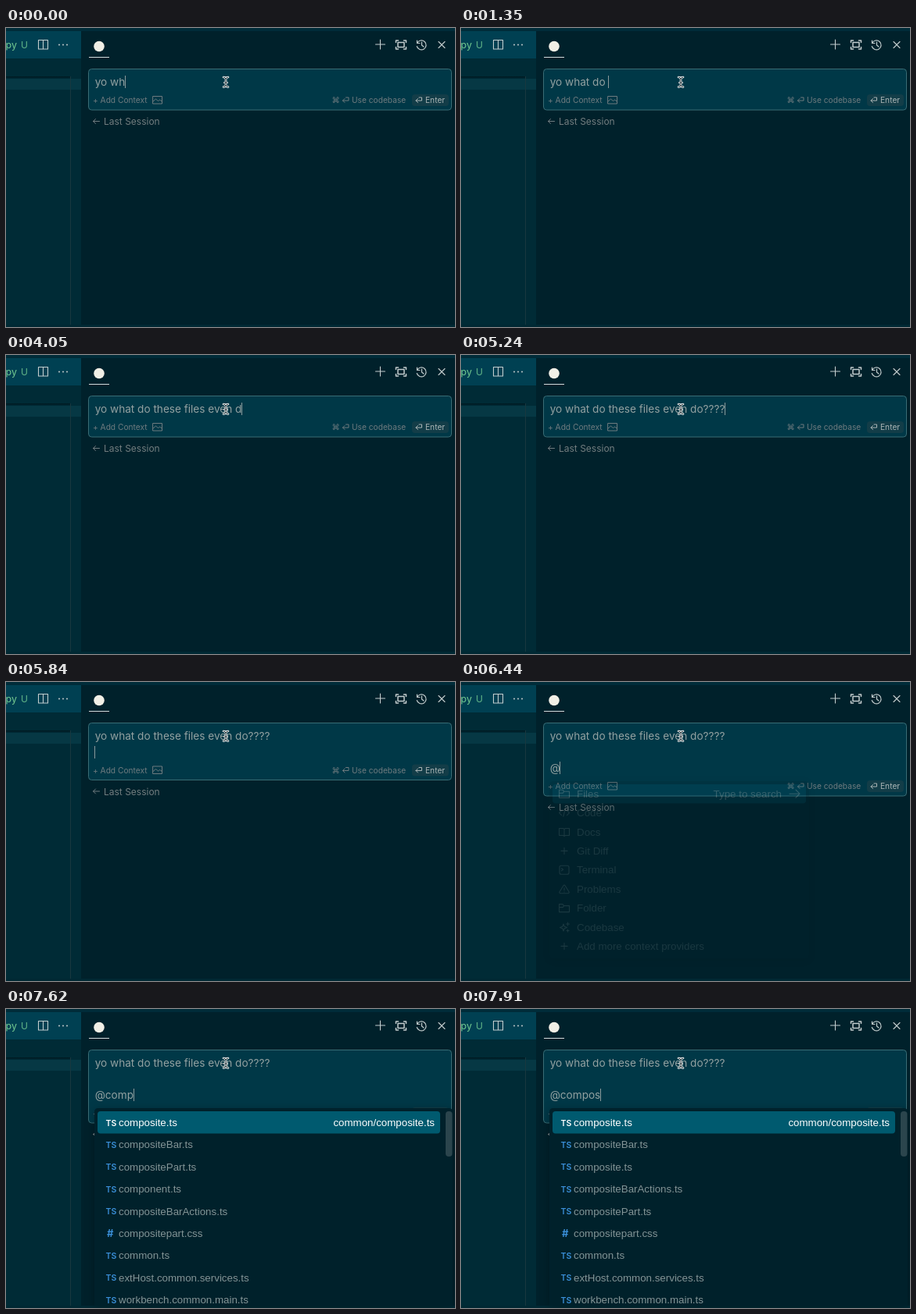
An HTML page that plays this animation: 574 px wide and 383 px high, repeating every 8 s.

```html
<!DOCTYPE html>
<html lang="en">
<head>
<meta charset="utf-8">
<title>Chat context menu</title>
<style>
  html, body { margin: 0; width: 100%; height: 100%; overflow: hidden; background: #00212b; }
  svg { display: block; }
  text { font-family: Inter, "Open Sans", sans-serif; white-space: pre; }
  .line { fill: none; stroke-linecap: round; stroke-linejoin: round; }
  .tool { stroke: #c3cccd; stroke-width: 1.1; }
  .prompt { font-size: 13.6px; fill: #93a1a1; }
  .small { font-size: 10.2px; fill: #6f7b7f; }
  .dim { stroke: #6f7b7f; }
  .last { font-size: 12px; fill: #727d7f; }
  #menu text { font: 13.333px "Liberation Sans", Arial, sans-serif; fill: #839496; }
  #menu .line { stroke: #839496; stroke-width: 1.1; }
  #menu .on text { fill: #fff; }
  #menu .on .line { stroke: #fff; }
  #menu .kind { font: 600 10.5px Inter, sans-serif; fill: #3a8fd8; }
  #menu .hash { font: 700 13px Inter, sans-serif; fill: #3a8fd8; }
  .panel { fill: #00212b; filter: drop-shadow(0 2px 6px #0004); }
</style>
</head>
<body>
<svg width="574" height="383" viewBox="0 0 574 383">
  <defs>
    <linearGradient id="fade" x2="0" y2="1">
      <stop stop-color="#001820"/><stop offset="1" stop-color="#001820" stop-opacity="0"/>
    </linearGradient>
    <path id="beam" d="M278 63q2.700 0 3 2.300q.300-2.300 3-2.300M278 75.500q2.700 0 3-2.300q.300 2.300 3 2.300M281 65.300v7.900M279.500 70h3"/>
    <path id="return" d="M4.500 0h3.500v4h-7.500M3 1.500L.500 4 3 6.500"/>
  </defs>
  <rect width="574" height="383" fill="#00212b"/>
  <rect width="96" height="383" fill="#002b36"/>
  <rect y="4" width="96" height="35" fill="#004052"/>
  <rect y="62" width="82" height="3" fill="url(#fade)"/>
  <rect y="65" width="96" height="14" fill="#063844"/>
  <path d="M82.500 62V380" stroke="#18383f"/>
  <rect width="574" height="4" fill="#002c39"/>
  <rect y="380" width="574" height="3" fill="#002833"/>

  <g fill="#73c991">
    <text x="14" y="26" font-size="12.500" text-anchor="end">py</text>
    <text x="19" y="26" font-size="12" opacity=".85">U</text>
  </g>
  <g class="line tool">
    <path d="M41.500 15.500h12v11.500h-12zM47.500 15.500v11.500"/>
    <path d="M472.500 21h12M478.500 15v12"/>
    <path d="M498.500 18.500V16h3M508.500 16h3v2.500M511.500 24.500V27h-3M501.500 27h-3v-2.500M501 18.500h8v6h-8z" stroke-width="1.500"/>
    <path d="M525.500 16v3.500h3.500M525.700 19.200A6 6 0 1 1 525.300 23.500M531.500 18v4l2.500 2" stroke-width="1.200"/>
    <path d="M553 17.500l8 8M561 17.500l-8 8"/>
  </g>
  <g fill="#c3cccd">
    <circle cx="68" cy="21.500" r="1"/><circle cx="73" cy="21.500" r="1"/><circle cx="78" cy="21.500" r="1"/>
  </g>
  <circle cx="119" cy="23.500" r="6.800" fill="#f1efe6"/>
  <path d="M106 37.500h26" stroke="#d5dadb"/>

  <rect id="box" x="105.500" y="52.500" width="464" rx="4" fill="#003847" stroke="#3a6c74"/>
  <text class="prompt" x="113.700" y="74"></text>
  <text class="prompt" x="113.700" y="94.500"></text>
  <text class="prompt" x="113.700" y="115"></text>
  <rect id="caret" width="1" height="16" fill="#8b9a9b"/>

  <g id="foot">
    <text class="small" x="111" y="96">+ Add Context</text>
    <path class="line dim" d="M188 87.500h11.500v9.500h-11.500zM188 94l3.500-3 3 2.500 2-1.500 3 2"/>
    <text class="small" x="416.500" y="96" style="font-family:'DejaVu Sans',sans-serif">⌘</text>
    <use href="#return" class="line dim" x="430" y="89"/>
    <text class="small" x="442" y="96">Use codebase</text>
    <rect x="519" y="85" width="47" height="15" rx="4" fill="#133d48"/>
    <use href="#return" class="line" stroke="#a9b4b5" x="523.500" y="89"/>
    <text class="small" x="536" y="96" style="fill:#a9b4b5">Enter</text>
    <path class="line dim" d="M119.500 119.500h-8M114.500 116.500l-3 3 3 3"/>
    <text class="last" x="125" y="124">Last Session</text>
  </g>

  <g id="menu"></g>

  <g class="line">
    <use href="#beam" stroke="#fff" stroke-width="2.600"/>
    <use href="#beam" stroke="#0a1c22" stroke-width=".900"/>
  </g>
</svg>
<script>
const LOOP = 8000;

// [time, typed characters]
const keys = [
  [0, 'yo wh'], [150, 'at'], [750, ' '], [1050, 'do'],
  ...[...' these '].map((c, i) => [1350 + i * 150, c]),
  [2550, 'fi'], [2700, 'l'], [2850, 'es'], [3150, ' '],
  [3450, 'e'], [3600, 'v'], [3750, 'en'], [4050, ' d'], [4350, 'o'],
  [4650, '?'], [4790, '?'], [5090, '?'], [5240, '?'],
  [5840, '\n'], [6140, '\n'], [6440, '@'],
  [7030, 'c'], [7180, 'o'], [7330, 'm'], [7620, 'p'], [7770, 'o'], [7910, 's']
];

const folder = 'M.5 12V2h4.500l1.500 2h7v8zM.5 6h5l1-2';
const plus = 'M7 3v8M3 7h8';
const sparkle = 'M6 3l1.200 3.300L10.500 7.500 7.200 8.700 6 12 4.800 8.700 1.500 7.500 4.800 6.300zM11.500 1v4M9.500 3h4M11.500 10v3M10 11.500h3';
const code = 'M3.500 4L.5 7l3 3M10.500 4l3 3-3 3M8.200 2.500l-2.400 9';
const providers = [
  ['Files', folder], ['Code', code],
  ['Docs', 'M.5 2.500h5L7 3.500l1.500-1h5v9h-5L7 12.500l-1.500-1h-5zM7 3.500v9'],
  ['Git Diff', plus],
  ['Terminal', 'M3 1.500h8q2 0 2 2v7q0 2-2 2H3q-2 0-2-2v-7q0-2 2-2zM3.500 5l2 1.500-2 1.500'],
  ['Problems', 'M6 2.500q1-1.500 2 0l5 8q.7 1.800-1 2H2q-1.700-.2-1-2zM7 5.500v3M7 10.500v.2'],
  ['Folder', folder], ['Codebase', sparkle], ['Add more context providers', plus]
];
const matches = [providers[1], providers[7]];

const common = ['common.ts', 'composite.ts', 'command.ts', 'comments.ts', 'compositeBar.ts',
  'compare.ts', 'commands.ts', 'extHost.common.services.ts', 'workbench.common.main.ts'];
const composites = ['composite.ts', 'compositeBar.ts', 'composite.ts', 'compositeBarActions.ts',
  'compositePart.ts', 'compositepart.css', 'common.ts', 'extHost.common.services.ts',
  'workbench.common.main.ts'];
const components = ['composite.ts', 'compositeBar.ts', 'compositePart.ts', 'component.ts',
  'compositeBarActions.ts', 'compositepart.css', ...composites.slice(6)];

const $ = id => document.getElementById(id);
const lines = document.querySelectorAll('.prompt');
const pen = document.createElement('canvas').getContext('2d');
pen.font = '13.6px Inter, "Open Sans", sans-serif';

const highlight = (right, h) =>
  `<rect x="117" y="131" width="${right - 117}" height="${h}" rx="4" fill="#005a6f"/>`;

function providerMenu(items, right) {
  const pitch = 24.4;
  const rows = items.map(([name, icon], i) => {
    const y = 143.2 + i * pitch;
    const hint = i ? '' :
      `<text x="${right - 31}" y="${y + 4.5}" text-anchor="end">Type to search</text>` +
      `<path class="line" d="M${right - 21} ${y}h13m-5 -5l5 5l-5 5"/>`;
    return `<g class="${i ? '' : 'on'}"><path class="line" transform="translate(125 ${y - 7})" d="${icon}"/>` +
      `<text x="148" y="${y + 4.5}">${name}</text>${hint}</g>`;
  });
  return `<rect class="panel" x="113" y="127" width="${right - 109}" height="${items.length * pitch + 8}" rx="5"/>` +
    highlight(right, 24.4) + rows.join('');
}

function fileMenu(files) {
  const rows = files.map((name, i) => {
    const y = 150 + i * 28.4;
    const css = name.endsWith('css');
    const path = i ? '' : `<text x="548" y="${y}" text-anchor="end">common/${name}</text>`;
    return `<g class="${i ? '' : 'on'}"><text class="${css ? 'hash' : 'kind'}" x="${css ? 129 : 127.5}" y="${y - .5}">${css ? '#' : 'TS'}</text>` +
      `<text x="144" y="${y}">${name}</text>${path}</g>`;
  });
  return '<path class="panel" d="M113 380V132q0-5 5-5h448q5 0 5 5v248z"/>' + highlight(555, 28.4) + rows.join('') +
    '<rect x="562" y="131" width="8.500" height="58" rx="4" fill="#2b454d"/>';
}

function menuFor(query) {
  if (!query) return '';
  if (query === '@') return providerMenu(providers, 441);
  if (query.length < 4) return providerMenu(matches, 407);
  if (query === '@com') return fileMenu(common);
  return fileMenu(query === '@comp' ? components : composites);
}

let shown;
function draw(t) {
  const text = keys.filter(k => k[0] <= t).map(k => k[1]).join('');
  $('caret').style.opacity = t >= 600 && t < 750 ? 0 : 1;
  $('menu').style.opacity = t < 6590 ? .2 : t < 6730 ? .85 : 1;
  if (text === shown) return;
  shown = text;

  const rows = text.split('\n');
  const last = rows.length - 1;
  const drop = last * 20.5;
  lines.forEach((el, i) => el.textContent = rows[i] || '');
  $('caret').setAttribute('x', Math.round(113.3 + pen.measureText(rows[last]).width));
  $('caret').setAttribute('y', Math.round(61 + drop));
  $('box').setAttribute('height', 52.5 + drop);
  $('foot').setAttribute('transform', `translate(0 ${drop})`);
  $('menu').innerHTML = menuFor(rows[2]);
}

function tick() {
  draw(performance.now() % LOOP);
  requestAnimationFrame(tick);
}
tick();
</script>
</body>
</html>
```
